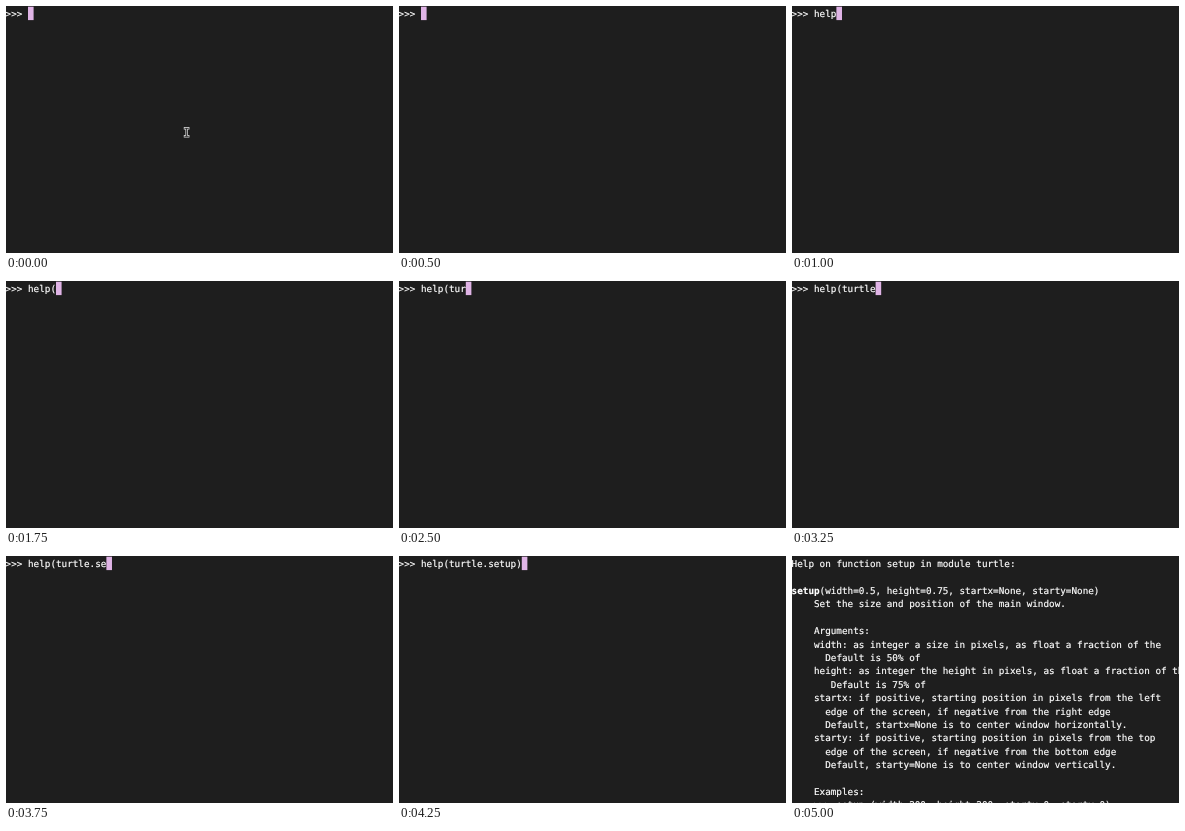
These frames come from a looping animation (387x247 px, 5750 ms). An HTML page:

```html
<!DOCTYPE html>
<html lang="en">
<head>
<meta charset="utf-8">
<title>Terminal help</title>
<style>
  html, body { margin: 0; width: 100%; height: 100%; overflow: hidden; background: #1e1e1e; }
  svg { display: block; width: 387px; height: 247px; }
  text {
    font: 9.3px "DejaVu Sans Mono", "Liberation Mono", monospace;
    fill: #fff;
    stroke: #fff;
    stroke-width: 0.2px;
    white-space: pre;
    text-rendering: geometricPrecision;
  }
  .bold { font-weight: bold; }
</style>
</head>
<body>
<svg viewBox="0 0 387 247">
  <rect width="387" height="247" fill="#1e1e1e"/>
  <g id="prompt">
    <rect id="cursor" y="0.7" width="5.6" height="13.4" fill="#e0b4e6"/>
    <text id="line"></text>
  </g>
  <g id="page"></g>
  <g id="beam" fill="none">
    <path d="M177.8 122.3h5.6M180.6 122.3v8M177.8 130.3h5.6" stroke="#dcdcdc" stroke-width="2.4"/>
    <path d="M178.4 122.3h4.4M180.6 122.3v8M178.4 130.3h4.4" stroke="#1e1e1e" stroke-width="0.9"/>
  </g>
</svg>
<script>
const LOOP = 5750, PAGE_AT = 5000, BEAM_END = 500;
const CHAR = 5.599, LEFT = -0.4, BASE = 11.1, ROW = 13.4;
const PROMPT = ">>> ", COMMAND = "help(turtle.setup)";

// [time in ms, characters typed]
const typing = [
  [0, 0], [750, 2], [1000, 4], [1750, 5], [2250, 6], [2500, 8], [2750, 9],
  [3000, 10], [3250, 11], [3500, 13], [3750, 14], [4000, 17], [4250, 18]
];

const help = `Help on function setup in module turtle:

*setup*(width=0.5, height=0.75, startx=None, starty=None)
    Set the size and position of the main window.

    Arguments:
    width: as integer a size in pixels, as float a fraction of the
      Default is 50% of
    height: as integer the height in pixels, as float a fraction of the
       Default is 75% of
    startx: if positive, starting position in pixels from the left
      edge of the screen, if negative from the right edge
      Default, startx=None is to center window horizontally.
    starty: if positive, starting position in pixels from the top
      edge of the screen, if negative from the bottom edge
      Default, starty=None is to center window vertically.

    Examples:
    >>> setup (width=200, height=200, startx=0, starty=0)`;

const $ = id => document.getElementById(id);
const prompt = $("prompt"), cursor = $("cursor"), line = $("line");
const page = $("page"), beam = $("beam");
const show = (el, on) => el.setAttribute("visibility", on ? "visible" : "hidden");

function place(el, col, row) {
  el.setAttribute("x", LEFT + col * CHAR);
  el.setAttribute("y", BASE + row * ROW);
}

function addText(str, col, row, bold) {
  const el = document.createElementNS("http://www.w3.org/2000/svg", "text");
  place(el, col, row);
  if (bold) el.setAttribute("class", "bold");
  el.textContent = str;
  page.append(el);
}

help.split("\n").forEach((str, row) => {
  let col = 0;
  str.split("*").forEach((part, i) => {
    const body = part.trimStart();
    const indent = part.length - body.length;
    if (body) addText(body, col + indent, row, i % 2 === 1);
    col += part.length;
  });
});
place(line, 0, 0);

function draw(t) {
  let count = 0;
  for (const [at, n] of typing) if (t >= at) count = n;
  line.textContent = PROMPT + COMMAND.slice(0, count);
  cursor.setAttribute("x", LEFT + (PROMPT.length + count) * CHAR);
  show(prompt, t < PAGE_AT);
  show(page, t >= PAGE_AT);
  show(beam, t < BEAM_END);
}

const start = performance.now();
function tick(now) {
  draw(Math.max(0, now - start) % LOOP);
  requestAnimationFrame(tick);
}
draw(0);
requestAnimationFrame(tick);
</script>
</body>
</html>
```
